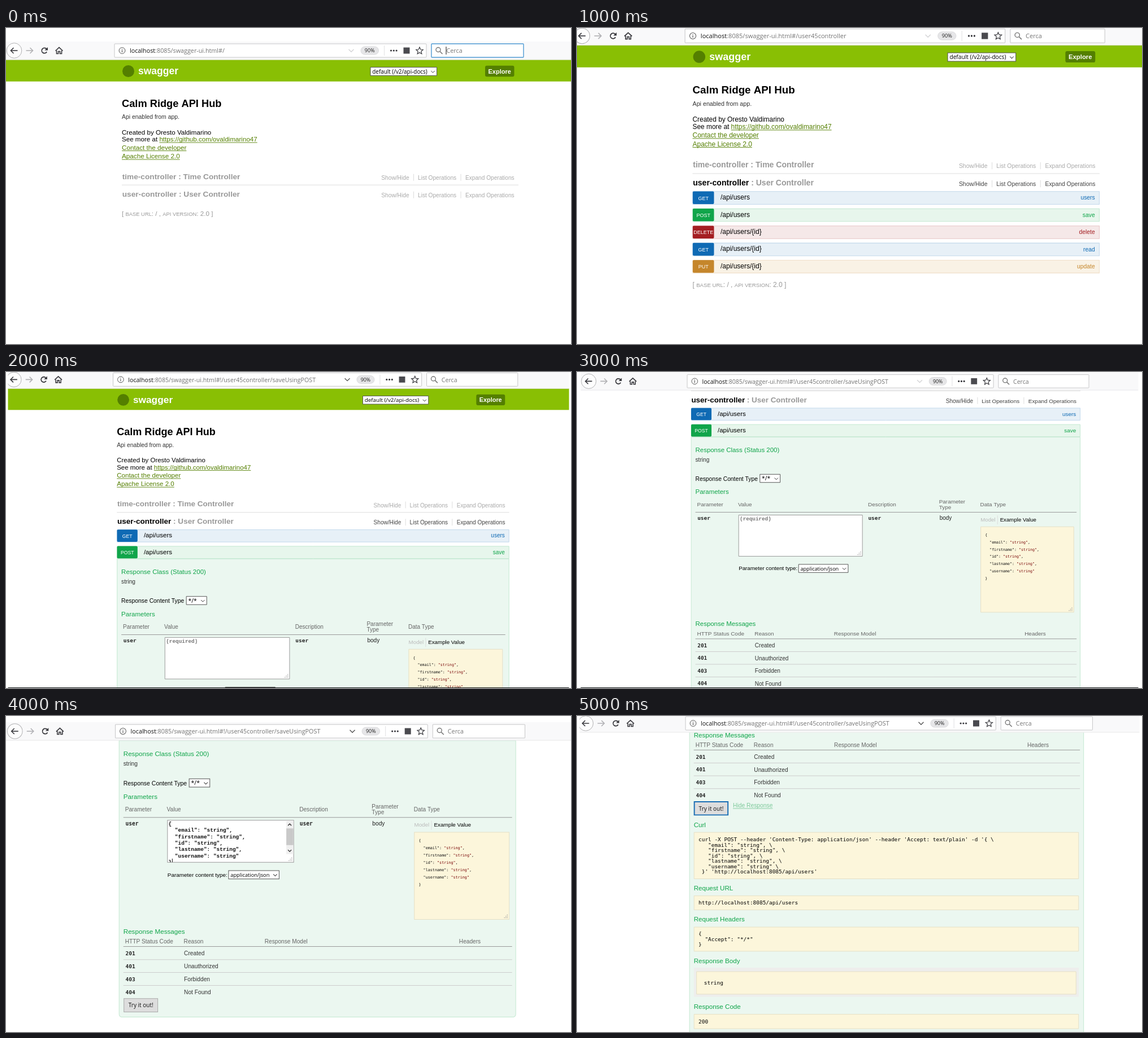
These frames come from a looping animation (1000x560 px, 6000 ms). An HTML page with a canvas:

```html
<!DOCTYPE html>
<html lang="en">
<head>
<meta charset="utf-8">
<title>API page walkthrough</title>
<style>
html, body { margin: 0; width: 100%; height: 100%; overflow: hidden; background: #fff; }
canvas { display: block; }
</style>
</head>
<body>
<canvas id="stage" width="1000" height="560"></canvas>
<script>
const ctx = document.getElementById('stage').getContext('2d');
const SANS = '"Liberation Sans", Arial, sans-serif';
const UI = '"Open Sans", sans-serif';
const MONO = '"DejaVu Sans Mono", monospace';
const COURIER = '"Liberation Mono", monospace';
const GREEN = '#10a54a', LINK = '#547f00', CREAM = '#fcf6db';
const BAR_BOTTOM = 16.4;

const POST_URL = '#!/user45controller/saveUsingPOST';
// zoom, page left and top, toolbar left and middle, side margin
const scenes = [
  { zoom: 1, x: 205, y: 57, barX: 205, barY: 40, edge: 0, hash: '#/', focus: true },
  { zoom: 1.0263, x: 204.5, y: 31, barX: 204.5, barY: 14, edge: 0, hash: '#/user45controller', list: true },
  { zoom: 0.9893, x: 196.2, y: 30, barX: 202.4, barY: 13.4, edge: 3.5, hash: POST_URL, form: true, arrow: true, taskbar: true },
  { zoom: 0.982, x: 201.7, y: -183.7, barX: 207.8, barY: 16.4, edge: 6.5, hash: POST_URL, form: true, taskbar: true },
  { zoom: 1.0014, x: 199.7, y: -261, barX: 206.5, barY: 27, edge: 0, hash: POST_URL, form: true, arrow: true, filled: true },
  { zoom: 0.995, x: 198.7, y: -605, barX: 205, barY: 13, edge: 4.5, hash: POST_URL, form: true, arrow: true, filled: true, response: true },
];

const fields = ['email', 'firstname', 'id', 'lastname', 'username'];
const jsonLines = ['{', ...fields.map((f, i) => `  "${f}": "string"${i < 4 ? ',' : ''}`), '}'];

function text(str, x, y, size, color = '#000', family = SANS, weight = '') {
  ctx.font = `${weight} ${size}px ${family}`;
  ctx.fillStyle = color;
  ctx.fillText(str, x, y);
  return x + ctx.measureText(str).width;
}
const bold = (str, x, y, size, color, family) => text(str, x, y, size, color, family, 'bold');

function aligned(align, ...args) {
  ctx.textAlign = align;
  text(...args);
  ctx.textAlign = 'left';
}

function lines(list, x, y, step, size, color, family, weight) {
  list.forEach((str, i) => text(str, x, y + i * step, size, color, family, weight));
}

function link(str, x, y, size, color = LINK) {
  const end = text(str, x, y, size, color);
  line(x, y + 1.8, end, y + 1.8, color, 0.9);
}

function path(points, color, width = 1) {
  ctx.beginPath();
  points.forEach(([x, y]) => ctx.lineTo(x, y));
  ctx.strokeStyle = color;
  ctx.lineWidth = width;
  ctx.stroke();
}
const line = (x1, y1, x2, y2, color, width) => path([[x1, y1], [x2, y2]], color, width);

function box(x1, y1, x2, y2, fill, border, radius = 0, width = 1) {
  ctx.beginPath();
  ctx.roundRect(x1, y1, x2 - x1, y2 - y1, radius);
  ctx.fillStyle = fill;
  ctx.fill();
  if (!border) return;
  ctx.strokeStyle = border;
  ctx.lineWidth = width;
  ctx.stroke();
}

function circle(x, y, r, fill, border, width = 1) {
  ctx.beginPath();
  ctx.arc(x, y, r, 0, 7);
  if (fill) { ctx.fillStyle = fill; ctx.fill(); }
  if (border) { ctx.strokeStyle = border; ctx.lineWidth = width; ctx.stroke(); }
}

// A negative rise points the chevron up.
const chevron = (x, y, r, color, width = 1, rise = r) =>
  path([[x - r, y - rise / 2], [x, y + rise / 2], [x + r, y - rise / 2]], color, width);

function select(x1, y1, x2, label, size) {
  box(x1, y1, x2, y1 + 14.7, '#fff', '#555');
  text(label, x1 + 3.3, y1 + 11, size, '#000', UI);
  chevron(x2 - 7, y1 + 8, 3.2, '#333');
}

function grip(x, y) {
  ctx.fillStyle = '#999';
  for (let i = 0; i < 3; i++)
    for (let j = 0; j <= i; j++) ctx.fillRect(x - j * 2.5, y - (2 - i) * 2.5, 1.2, 1.2);
}

function toolbar({ hash, focus, arrow }) {
  const dark = '#38383d';
  box(-100, -16, 1100, BAR_BOTTOM, '#f9f9fa');
  line(-100, BAR_BOTTOM - 0.4, 1100, BAR_BOTTOM - 0.4, '#e2e2e4', 0.8);

  circle(14.5, 0, 13.3, '#fdfdfd', '#b1b1b3');
  for (const [x, dir, color] of [[14.5, 1, dark], [41.5, -1, '#b1b1b4']]) {
    line(x - 6, 0, x + 6, 0, color, 1.6);
    path([[x - dir, -5], [x - 6 * dir, 0], [x - dir, 5]], color, 1.6);
  }
  ctx.beginPath();
  ctx.arc(68, 0, 4.7, 0.5, 5.6);
  ctx.strokeStyle = dark;
  ctx.lineWidth = 1.8;
  ctx.stroke();
  ctx.fillStyle = dark;
  ctx.fill(new Path2D('M74-6v5.5h-5.5z'));
  path([[87.5, 0.5], [94, -5.5], [100.5, 0.5]], dark, 1.7);
  path([[89.5, 0], [89.5, 5.5], [92.5, 5.5], [92.5, 1.5], [95.5, 1.5], [95.5, 5.5], [98.5, 5.5], [98.5, 0]], dark, 1.6);

  box(192, -12, 744, 12, '#fff', '#c6c6c8', 1);
  circle(205.5, 0, 5.4, null, '#555', 1);
  line(205.5, -0.8, 205.5, 3, '#555', 1.2);
  line(205.5, -3, 205.5, -1.8, '#555', 1.2);
  const end = text('localhost', 219, 4.3, 10.77, '#111', UI);
  text(':8085/swagger-ui.html' + hash, end, 4.3, 10.77, '#737373', UI);
  chevron(611, 0, 4.5, arrow ? '#555' : '#d4d4d6', 1.4);
  box(628, -7, 659.5, 7, '#e6e6e8', '#d2d2d5', 7, 0.7);
  aligned('center', '90%', 643.7, 3.3, 9, '#222', UI);
  line(669.5, -9, 669.5, 9, '#dedee0', 0.9);
  for (const x of [681.5, 686.3, 691.1]) circle(x, 0, 1.6, dark);
  box(703.5, -5.5, 714.5, 5.5, '#4a4a4f');
  const star = [];
  for (let i = 0; i <= 11; i++) {
    const a = i * Math.PI / 5, r = i % 2 ? 3 : 6.5;
    star.push([732 + r * Math.sin(a), 0.4 - r * Math.cos(a)]);
  }
  path(star, dark, 1.2);

  box(753, -12, 916, 12, '#fff', focus ? '#4f9ad3' : '#c6c6c8', 1, focus ? 1.4 : 1);
  circle(765, -1.5, 4, null, '#777', 1.4);
  line(768, 1.5, 772.5, 6, '#777', 1.6);
  text('Cerca', 779.5, 4.3, 10.77, '#777', UI);
  if (focus) line(779, -7, 779, 7, '#111', 1);
}

function intro() {
  box(-100, -1, 1100, 37.7, '#89bf04');
  circle(216.5, 19.5, 10.5, LINK);
  bold('swagger', 234, 25, 17.5, '#fff');
  select(645, 12.6, 762.5, 'default (/v2/api-docs)', 9.9);
  box(848, 9.8, 899.5, 29.3, LINK, null, 3);
  bold('Explore', 853.5, 23.6, 11, '#fff');

  bold('Calm Ridge API Hub', 205, 82.5, 18.25);
  text('Api enabled from app.', 205, 103.8, 10.43, '#333');
  text('Created by Oresto Valdimarino', 205, 131.5, 11.6);
  link('https://github.com/ovaldimarino47', text('See more at ', 205, 144.2, 11.6), 144.2, 11.6);
  link('Contact the developer', 205, 158.8, 11.7);
  link('Apache License 2.0', 205, 174.2, 11.7);
}

function controller(name, title, y, active) {
  const end = bold(name, 205.7, y, 13.68, active ? '#000' : '#999');
  bold(' : ' + title, end, y, 13.68, '#999');
  const color = active ? '#444' : '#aaa';
  text('Show/Hide', 664.3, y + 1.2, 10.2, color);
  text('List Operations', 729, y + 1.2, 10.15, color);
  text('Expand Operations', 813, y + 1.2, 10.15, color);
  for (const x of [721.5, 805]) line(x, y - 9, x, y + 3, '#ddd');
}

const palette = {
  GET: ['#0f6ab4', '#e7f0f7', '#c3d9ec'],
  POST: [GREEN, '#e7f6ec', '#c3e8d1'],
  DELETE: ['#a41e22', '#f5e8e8', '#e8c6c7'],
  PUT: ['#c5862b', '#f9f2e5', '#f0e0ca'],
};
const operations = [
  ['GET', '', 'users'], ['POST', '', 'save'], ['DELETE', '/{id}', 'delete'],
  ['GET', '/{id}', 'read'], ['PUT', '/{id}', 'update'],
];

function operation([method, suffix, action], i) {
  const y = 251.9 + i * 29.65;
  const [color, fill, border] = palette[method];
  box(205.5, y + 0.3, 906.5, y + 22.3, fill, border);
  box(205.3, y, 242, y + 22, color, null, 2);
  aligned('center', method, 223.7, y + 14.7, 8.75, '#fff');
  text('/api/users' + suffix, 253.2, y + 14.2, 11.7);
  aligned('right', action, 899, y + 14.4, 10.1, color);
}

function baseUrl(y) {
  let x = 205;
  for (const [str, size] of [['[ ', 11.7], ['BASE URL', 9.4], [': / , ', 11.7], ['API VERSION', 9.4], [': 2.0 ]', 11.7]])
    x = text(str, x, y, size, '#999');
}

const heading = (str, y) => text(str, 213, y, 11.65, GREEN);
const column = (str, x, y) => text(str, x, y, 10.15, '#666');

function form({ filled, response }) {
  box(205.5, 304.4, 906.5, response ? 1300 : 793.4, '#ebf7f0', '#c3e8d1', [0, 0, 5, 5]);
  heading('Response Class (Status 200)', 332);
  text('string', 213, 349, 10.3, '#333');
  text('Response Content Type', 213, 383.2, 10.48);
  select(329.3, 371.7, 365.8, '*/*', 10.5);

  heading('Parameters', 407);
  column('Parameter', 216, 429.7);
  column('Value', 289.7, 429.7);
  column('Description', 524, 429.7);
  column('Parameter', 652, 424.7);
  column('Type', 652, 434.3);
  column('Data Type', 726.3, 429.7);
  line(213, 440.2, 900, 440.2, '#999');
  bold('user', 216.7, 454, 9.6, '#222', MONO);
  bold('user', 524.5, 454, 9.6, '#222', MONO);
  text('body', 653, 454, 10.2, '#222');

  valueBox(filled);
  text('Parameter content type:', 291, 545, 9.93);
  select(399, 534.2, 488.3, 'application/json', 9.25);

  text('Model', 727, 456.6, 9.85, '#bbb');
  line(757.5, 446, 757.5, 462, '#ddd');
  text('Example Value', 762, 456.6, 9.85);
  box(727.3, 466.3, 895, 620.7, CREAM, '#e5e0c6');
  jsonLines.forEach((str, i) => {
    let x = 735;
    for (const part of str.split(/("string")/))
      x = text(part, x, 483.7 + i * 12.95, 6.75, part === '"string"' ? '#700' : '#111', MONO);
  });
  grip(891, 617);
  messages(response);
}

function valueBox(filled) {
  box(291, 445.2, 514, 519.6, '#fff', '#999');
  if (filled) {
    ctx.save();
    ctx.beginPath();
    ctx.rect(291, 445, 210, 74.2);
    ctx.clip();
    lines(jsonLines, 292.7, 454, 11.45, 9.45, '#111', COURIER, 'bold');
    line(299.5, 513, 299.5, 522, '#111');
    ctx.restore();
    box(501, 446, 513.5, 505, '#f0f0f0');
    box(501, 459.5, 513.5, 489, '#c9c9c9');
    chevron(507, 453, 3, '#444', 1.5, -3);
    chevron(507, 499, 3, '#444', 1.5);
  } else {
    bold('(required)', 293, 454.4, 9.45, '#777', COURIER);
  }
  grip(510, 516);
}

function messages(focused) {
  heading('Response Messages', 645.8);
  column('HTTP Status Code', 216, 663);
  column('Reason', 319.7, 663);
  column('Response Model', 462.7, 663);
  column('Headers', 806.3, 663);
  line(213, 668.6, 900, 668.6, '#999');
  [['201', 'Created'], ['401', 'Unauthorized'], ['403', 'Forbidden'], ['404', 'Not Found']].forEach(([code, reason], i) => {
    const y = 684 + i * 22.85;
    bold(code, 216.8, y, 9.5, '#222', MONO);
    text(reason, 320.2, y + 0.2, 10.2, '#333');
    if (i < 3) line(213, y + 7.7, 900, y + 7.7, '#ccc');
  });
  box(214, 760.8, 273.8, 784.3, '#ddd', focused ? '#1b6fb5' : '#aaa', 0, focused ? 2 : 1);
  text('Try it out!', 222, 776.4, 10.05, '#111', UI);
}

function responseBlock(title, titleY, top, bottom, list, textY) {
  heading(title, titleY);
  box(213.5, top, 897.5, bottom, CREAM, '#e5e0c6');
  lines(list, 221.4, textY, 9.55, 9.49, '#000', MONO);
}

function responseArea() {
  link('Hide Response', 282.7, 771, 10.35, '#7cc99a');
  const data = fields.map((f, i) => `   "${f}": "string"${i < 4 ? ',' : ''} \\`);
  responseBlock('Curl', 805.6, 815.3, 898, [
    "curl -X POST --header 'Content-Type: application/json' --header 'Accept: text/plain' -d '{ \\",
    ...data, " }' 'http://localhost:8085/api/users'"], 831.2);
  responseBlock('Request URL', 918.7, 928.3, 953.4, ['http://localhost:8085/api/users'], 943.8);
  responseBlock('Request Headers', 974, 984, 1027, ['{', '  "Accept": "*/*"', '}'], 999.3);
  heading('Response Body', 1048.4);
  box(213, 1056.3, 898, 1108, '#eeeeec');
  box(218, 1063.3, 893, 1103.5, CREAM, '#e5e0c6');
  text('string', 231.2, 1086.8, 9.49, '#000', MONO);
  responseBlock('Response Code', 1130, 1139.3, 1165, ['200'], 1155.8);
}

function page(scene) {
  const active = scene.list || scene.form;
  intro();
  controller('time-controller', 'Time Controller', 210.7, false);
  line(205, 221.2, 907, 221.2, '#ddd');
  controller('user-controller', 'User Controller', 241.7, active);
  if (scene.form) form(scene);
  if (scene.response) responseArea();
  if (active) operations.slice(0, scene.form ? 2 : 5).forEach(operation);
  if (!scene.form) baseUrl(scene.list ? 417.5 : 276.2);
}

function place(zoom, x, y) {
  ctx.setTransform(zoom, 0, 0, zoom, x - 205 * zoom, y);
}

// Draws inside the side margins, from the given height down.
function clipped(edge, top, paint) {
  ctx.save();
  ctx.beginPath();
  ctx.rect(edge, top, 1000 - 2 * edge, 560 - top);
  ctx.clip();
  paint();
  ctx.restore();
}

function draw(scene) {
  const { zoom, x, y, barX, barY, edge } = scene;
  ctx.fillStyle = '#fff';
  ctx.fillRect(0, 0, 1000, 560);
  clipped(edge, barY + (BAR_BOTTOM - 1) * zoom, () => {
    place(zoom, x, y);
    page(scene);
  });
  clipped(edge, 0, () => {
    if (scene.taskbar) box(0, 559, 1000, 560, '#151a1a');
    place(zoom, barX, barY);
    toolbar(scene);
  });
}

const start = performance.now();
function tick() {
  const time = (performance.now() - start) % 6000;
  draw(scenes[Math.floor(time / 1000)]);
  requestAnimationFrame(tick);
}
tick();
</script>
</body>
</html>
```
